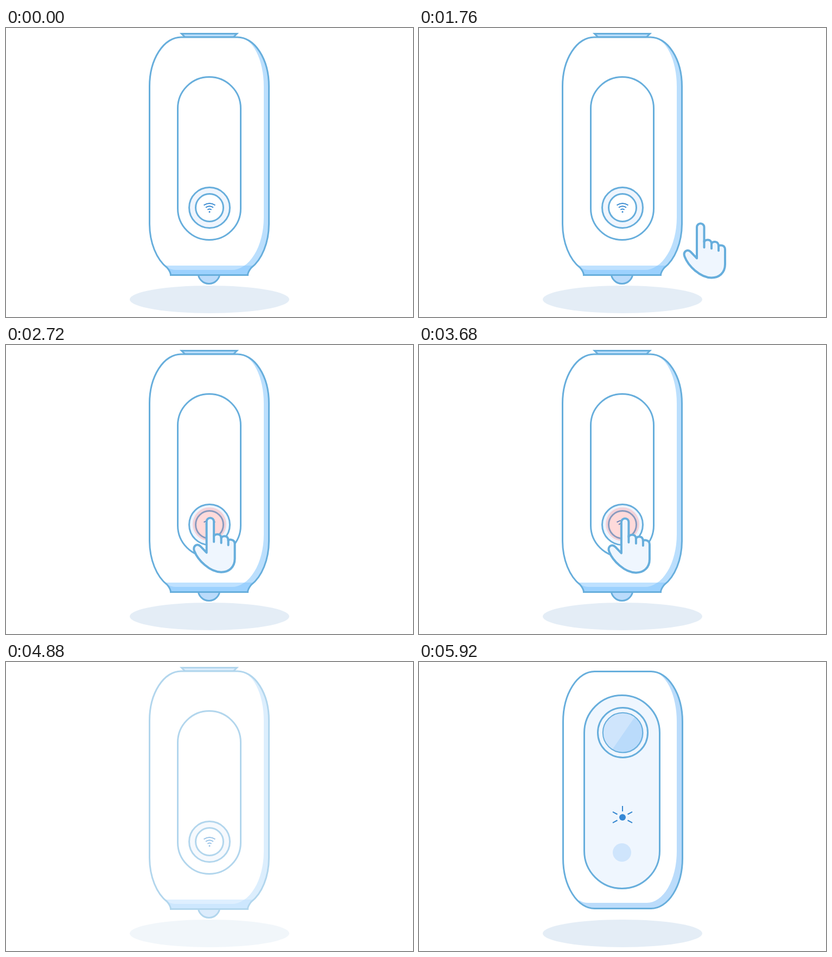
Write an HTML page that moves like this. It is 750x534 px and loops after 7.68 s.

```html
<!DOCTYPE html>
<html lang="en">
<head>
<meta charset="utf-8">
<title>Pairing the device</title>
<style>
  html, body { margin: 0; width: 100%; height: 100%; overflow: hidden; background: #fff; }
  svg { display: block; width: 100%; height: 100%; }
  .line { stroke: #67aedc; stroke-width: 3; }
  .icon { stroke: #3688d0; stroke-width: 2; }
</style>
</head>
<body>
<svg viewBox="0 0 750 534" fill="none">
  <defs>
    <path id="backBody" d="M322.500 17H426.500A58 91 0 0 1 484.500 108V362A58 91 0 0 1 452 443C449 447 445.500 451 445.500 456.500H303.500C303.500 451 300 447 297 443A58 91 0 0 1 264.500 362V108A58 91 0 0 1 322.500 17Z"/>
    <path id="frontBody" d="M323.500 17.500H427.500A58 93 0 0 1 485.500 110.500V362.500A58 93 0 0 1 427.500 455.500H323.500A58 93 0 0 1 265.500 362.500V110.500A58 93 0 0 1 323.500 17.500Z"/>
    <clipPath id="backClip"><use href="#backBody"/></clipPath>
    <clipPath id="frontClip"><use href="#frontBody"/></clipPath>
  </defs>

  <ellipse id="shadow" cx="375" cy="501.500" rx="147" ry="25.500" fill="#e4edf6"/>

  <g id="back">
    <path class="line" d="M323.500 10.500H425.500L419 17H330Z" fill="#bcdffd"/>
    <circle class="line" cx="374" cy="452.500" r="20" fill="#badbfb"/>
    <g clip-path="url(#backClip)">
      <use href="#backBody" fill="#bbdffd"/>
      <path d="M260 10H428V17A47 91 0 0 1 475 108V350A59 97 0 0 1 416 447H313Q303 447 297 442L260 442Z" fill="#fff"/>
      <path d="M260 439H490V460H260Z" fill="#7ec3ff" fill-opacity=".5"/>
    </g>
    <use href="#backBody" class="line"/>
    <rect class="line" x="316.500" y="90.500" width="116" height="301" rx="58"/>
    <circle class="line" cx="375" cy="332" r="37.500" fill="#eff5fd"/>
    <circle class="line" cx="375" cy="332" r="25.500" fill="#fff"/>
    <path class="icon" d="M364.500 327.500Q375 320.500 385.500 327.500M368 331.700Q375 326.700 382 331.700M371.300 335.800Q375 333.200 378.700 335.800"/>
    <circle cx="375" cy="339.700" r="1.500" fill="#3688d0"/>
  </g>

  <g id="front">
    <g clip-path="url(#frontClip)">
      <use href="#frontBody" fill="#bbdcfb"/>
      <path d="M260 10H428V17.500A47 93 0 0 1 475 110.500V350A55 95 0 0 1 420 445H312Q302 445 297 441L260 441Z" fill="#fff"/>
    </g>
    <use href="#frontBody" class="line"/>
    <rect class="line" x="304.500" y="61.500" width="139" height="357" rx="69.500" fill="#eff6fe"/>
    <circle class="line" cx="375.500" cy="130.500" r="46"/>
    <circle cx="375.500" cy="130.500" r="37" fill="#cfe5fc"/>
    <path d="M398 101A37 37 0 0 1 356 162Z" fill="#badbfb"/>
    <circle class="line" cx="375.500" cy="130.500" r="36.700" style="stroke-width:2"/>
    <path class="icon" d="M375 266V276M365.500 281.500L357 276.800M384.500 281.500L393 276.800M365.500 292.500L357 297.200M384.500 292.500L393 297.200"/>
    <circle cx="375" cy="287" r="6" fill="#3688d5"/>
    <circle cx="374" cy="352" r="17" fill="#cfe5fc"/>
  </g>

  <circle id="pulse" cx="375" cy="331" fill="#ff5a5a"/>

  <g id="hand" class="line" style="stroke-width:4" stroke-linecap="round" stroke-linejoin="round">
    <path fill="#eff6fe" d="M616 456V398.500A6.700 6.700 0 0 1 629.500 398.500V426C631 420.500 643 420 643 429C645 424 656 423.500 656 433.500C658 431 668 431 668 440V467C668 483 657 492 643 492C622 492 600 470 593.500 453C590 444 598 438 604.500 444Z"/>
    <path d="M629.500 424V436M643 428V438M656 432V442"/>
  </g>
</svg>
<script>
const LOOP = 7680, STEP = 80;
const [shadow, back, front, pulse, hand] =
  ["shadow", "back", "front", "pulse", "hand"].map(id => document.getElementById(id));

const ramp = (t, from, to) => Math.min(1, Math.max(0, (t - from) / (to - from)));
const ease = u => u * u * (3 - 2 * u);

function draw(t) {
  const backAlpha = 1 - ramp(t, 4560, 5200);
  const frontAlpha = ramp(t, 5200, 5440);
  back.setAttribute("opacity", backAlpha);
  front.setAttribute("opacity", frontAlpha);
  shadow.setAttribute("opacity", Math.max(backAlpha, frontAlpha));

  // The hand glides to the button and back along the same line.
  const reach = ease(ramp(t, 1200, 2400)) - ease(ramp(t, 3600, 4800));
  hand.setAttribute("transform", `translate(${12.6 - 259 * reach} ${3.7 - 76 * reach})`);
  hand.setAttribute("opacity", ramp(t, 880, 1200) - ramp(t, 3760, 4560));

  const glow = ramp(t, 2400, 2800) - ramp(t, 3600, 4000);
  pulse.setAttribute("r", 23 + 10 * glow);
  pulse.setAttribute("opacity", 0.28 * glow);
}

const start = performance.now();
function tick() {
  const t = (performance.now() - start) % LOOP;
  draw(Math.floor(t / STEP) * STEP);
  requestAnimationFrame(tick);
}
tick();
</script>
</body>
</html>
```
